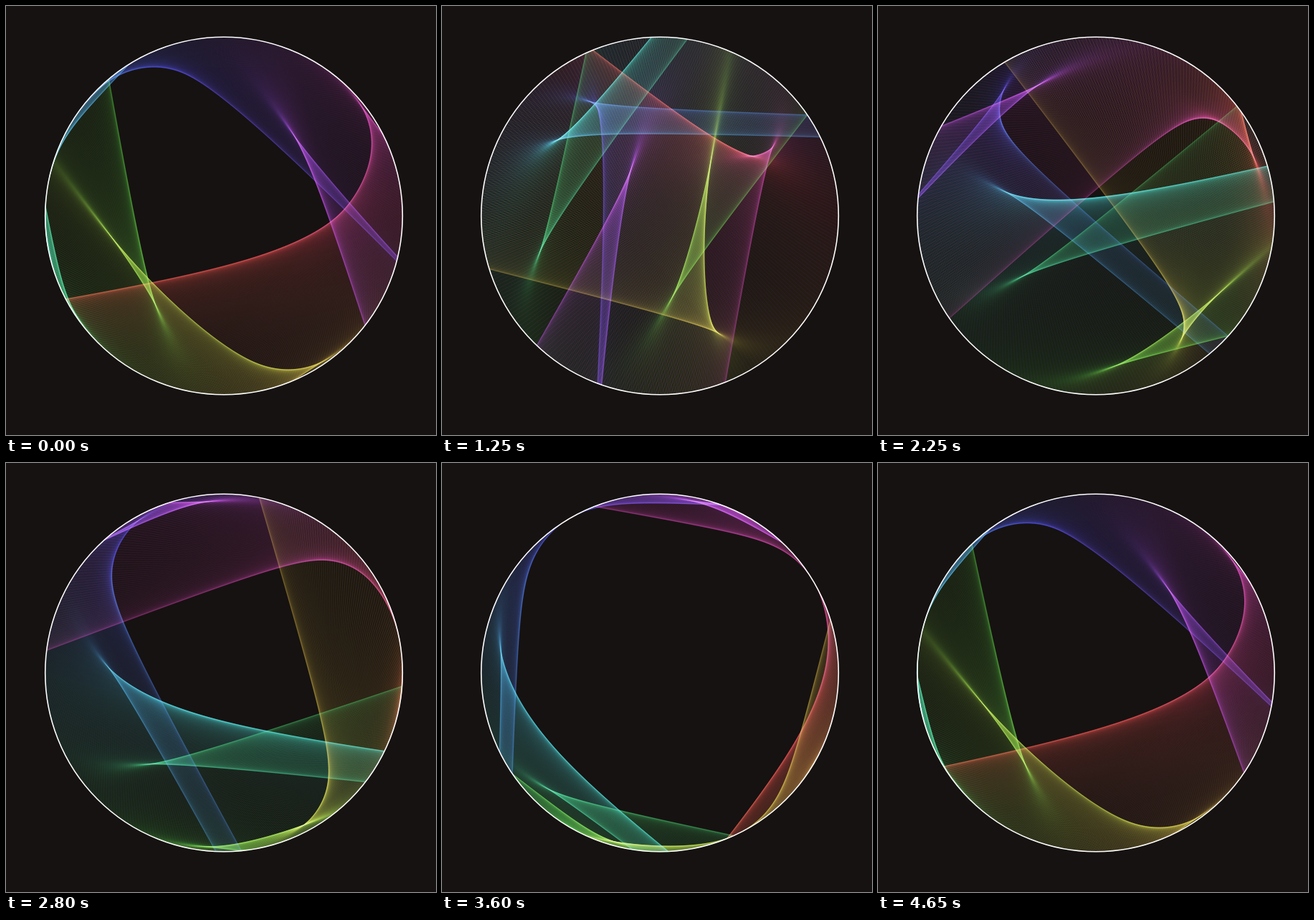
An HTML page with a canvas for the animation above (4700 ms loop, 600 by 598 pixels).

```html
<!DOCTYPE html>
<html lang="en">
<head>
<meta charset="utf-8">
<title>Chord envelopes</title>
<style>
  html, body { margin: 0; width: 100%; height: 100%; overflow: hidden; background: #161211; }
  canvas { display: block; width: 600px; height: 598px; }
</style>
</head>
<body>
<canvas id="stage" width="600" height="598"></canvas>
<script>
const ctx = document.getElementById('stage').getContext('2d', { alpha: false });
const CX = 304, CY = 292.5, R = 249.3;
const LOOP = 4700, STEP = 50, COUNT = 1800, START = 151.5;
const RAD = Math.PI / 180;

// Lag of a chord's moving end behind its fixed end, in degrees.
// It is even in the fixed end's angle, so 0 to 180 is enough.
const knots = [
  [0, -3], [9, -8.4], [19, -27], [28.5, -56], [38.9, -107], [46.5, -131],
  [57, -101], [65.5, -62], [70, -46.5], [78, -37.8], [87, -41], [94, -43],
  [101, -36.7], [107, -30.5], [112, -35], [117, -53], [126, -95],
  [131.5, -120], [140, -141], [146, -131.5], [151.5, -122], [162, -137],
  [172, -152], [180, -155.5]
];

// Cubic spline that is level at both ends.
function makeSpline(pts) {
  const n = pts.length - 1;
  const gap = [], slope = [], bend = new Array(n + 1).fill(0);
  for (let i = 0; i < n; i++) {
    gap[i] = pts[i + 1][0] - pts[i][0];
    slope[i] = (pts[i + 1][1] - pts[i][1]) / gap[i];
  }
  for (let pass = 0; pass < 200; pass++) {
    for (let i = 0; i <= n; i++) {
      const a = i > 0 ? gap[i - 1] : 0, b = i < n ? gap[i] : 0;
      const left = i > 0 ? slope[i - 1] : 0, right = i < n ? slope[i] : 0;
      const sides = (a ? a * bend[i - 1] : 0) + (b ? b * bend[i + 1] : 0);
      bend[i] = (6 * (right - left) - sides) / (2 * (a + b));
    }
  }
  return x => {
    let i = 0;
    while (i < n - 1 && x > pts[i + 1][0]) i++;
    const g = gap[i], v = (x - pts[i][0]) / g, u = 1 - v;
    return u * pts[i][1] + v * pts[i + 1][1] +
      ((u ** 3 - u) * bend[i] + (v ** 3 - v) * bend[i + 1]) * g * g / 6;
  };
}

const lag = makeSpline(knots);

const chords = Array.from({ length: COUNT }, (_, i) => {
  const deg = i * 360 / COUNT;
  return {
    x: CX + R * Math.cos(deg * RAD),
    y: CY + R * Math.sin(deg * RAD),
    end: deg + lag(Math.min(deg, 360 - deg)),
    color: `hsla(${deg}, 95%, 56%, 0.07)`
  };
});

function draw(ms) {
  const turn = START + 360 * ms / LOOP;
  ctx.globalCompositeOperation = 'source-over';
  ctx.fillStyle = '#161211';
  ctx.fillRect(0, 0, 600, 598);

  ctx.globalCompositeOperation = 'screen';
  ctx.lineWidth = 1;
  for (const c of chords) {
    const a = (c.end + turn) * RAD;
    ctx.strokeStyle = c.color;
    ctx.beginPath();
    ctx.moveTo(c.x, c.y);
    ctx.lineTo(CX + R * Math.cos(a), CY + R * Math.sin(a));
    ctx.stroke();
  }

  ctx.globalCompositeOperation = 'source-over';
  ctx.strokeStyle = '#fff';
  ctx.lineWidth = 1.6;
  ctx.beginPath();
  ctx.arc(CX, CY, R, 0, 2 * Math.PI);
  ctx.stroke();
}

const begin = performance.now();
let shown = 0;
draw(0);

function tick() {
  const ms = (performance.now() - begin) % LOOP;
  const step = Math.floor(ms / STEP);
  if (step !== shown) {
    shown = step;
    draw(step * STEP);
  }
  requestAnimationFrame(tick);
}
requestAnimationFrame(tick);
</script>
</body>
</html>
```
